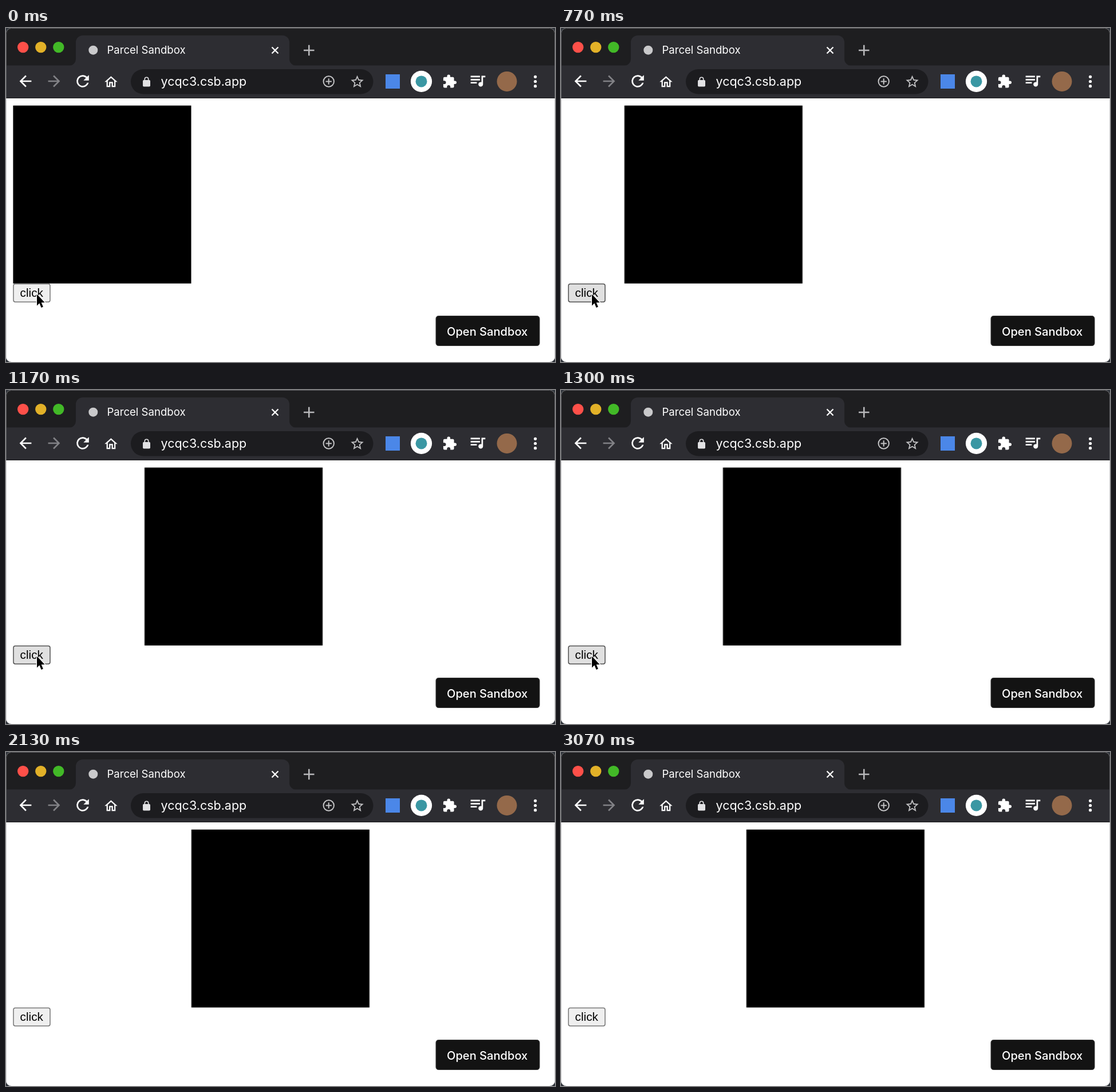
Recreate the animation shown at these times as an HTML page. Size 959x584 px, loop 3.11 s.

```html
<!DOCTYPE html>
<html lang="en">
<head>
<meta charset="utf-8">
<title>Sliding box</title>
<style>
  html, body { margin: 0; width: 100%; height: 100%; overflow: hidden; background: #30343b; }
  svg { display: block; width: 100%; height: 100%; }
  text { font-family: Inter, sans-serif; fill: #fff; white-space: pre; }

  .box, .cursor, .button { animation: 3110ms infinite step-end; }
  .box { animation-name: slide; }
  .cursor { animation-name: leave; }
  .button { animation-name: press; }

  /* Motion advances 30 times a second, with one dropped frame midway */
  @keyframes slide {
    0% { transform: translateX(0); }
    14.877% { transform: translateX(3.1px); animation-timing-function: steps(14); }
    29.882% { transform: translateX(151.3px); }
    30.954% { transform: translateX(168.2px); animation-timing-function: steps(14); }
    45.959%, 100% { transform: translateX(311.4px); }
  }
  @keyframes leave {
    0% { transform: translate(0, 0); }
    63.108% { transform: translate(30px, -14px); animation-timing-function: steps(5); }
    68.467%, 100% { transform: translate(1067px, -515px); }
  }
  @keyframes press {
    0% { fill: #efefef; stroke: #767676; }
    14.877% { fill: #e0e0e0; stroke: #4f4f4f; }
    63.108%, 100% { fill: #efefef; stroke: #767676; }
  }
</style>
</head>
<body>
<svg viewBox="0 0 959 584">
  <defs>
    <clipPath id="window"><rect width="959" height="584" rx="9"/></clipPath>
    <path id="arrow" d="M20 11H7.83l5.59-5.59L12 4l-8 8 8 8 1.41-1.41L7.83 13H20z"/>
  </defs>

  <g clip-path="url(#window)">
    <rect width="959" height="584" fill="#fff"/>

    <!-- Title bar, tab and toolbar -->
    <rect width="959" height="66" fill="#1e1e20"/>
    <rect y="65.5" width="959" height="57.5" fill="#2d2d32"/>
    <rect y="122" width="959" height="1" fill="#19191b"/>
    <path d="M110 66a12 12 0 0 0 12-12V25a12 12 0 0 1 12-12h349a12 12 0 0 1 12 12v29a12 12 0 0 0 12 12z" fill="#2d2d32"/>

    <circle cx="29.7" cy="33.6" r="9.7" fill="#fe5049"/>
    <circle cx="60.8" cy="33.6" r="9.7" fill="#e2b128"/>
    <circle cx="91.8" cy="33.6" r="9.7" fill="#42b927"/>

    <circle cx="152.3" cy="38.7" r="8" fill="#c9c9cb"/>
    <text x="176.4" y="45.4" font-size="18.6">Parcel Sandbox</text>
    <path d="M464.5 33.5l11 11m0-11l-11 11" stroke="#fff" stroke-width="2.3"/>
    <path d="M520 39h18.5m-9.25-9.25v18.5" stroke="#b8b8ba" stroke-width="2.6"/>

    <!-- Navigation -->
    <g fill="#fff">
      <use href="#arrow" transform="translate(18.4 77.4) scale(1.3)"/>
      <use href="#arrow" transform="translate(99.6 77.4) scale(-1.3 1.3)" fill="#828286"/>
      <path transform="translate(117.8 76.8) scale(1.35)" d="M17.65 6.35A7.96 7.96 0 0 0 12 4a8 8 0 1 0 7.73 10h-2.08A6 6 0 1 1 12 6c1.66 0 3.14.69 4.22 1.78L13 11h7V4z"/>
      <path transform="translate(170 80.9) scale(1.12)" d="M12 5.69l5 4.5V18h-2v-6H9v6H7v-7.81l5-4.5M12 3L2 12h3v8h6v-6h2v6h6v-8h3z"/>
    </g>

    <!-- Address field -->
    <rect x="218" y="72" width="423.5" height="43.5" rx="21.75" fill="#1c1c1f"/>
    <path transform="translate(235.8 84.6) scale(.81)" fill="#e2e2e4" d="M18 8h-1V6A5 5 0 0 0 7 6v2H6a2 2 0 0 0-2 2v10a2 2 0 0 0 2 2h12a2 2 0 0 0 2-2V10a2 2 0 0 0-2-2zM9 6a3 3 0 0 1 6 0v2H9z"/>
    <text x="270.5" y="101.3" font-size="21.5">ycqc3.csb.app</text>
    <g fill="none" stroke="#c2c2c4" stroke-width="2">
      <circle cx="563.7" cy="93.5" r="9.2"/>
      <path d="M558.5 93.5h10.4m-5.2-5.2v10.4"/>
    </g>
    <path transform="translate(600.1 80.4) scale(1.12)" fill="#c2c2c4" d="M22 9.24l-7.19-.62L12 2 9.19 8.63 2 9.24l5.46 4.73L5.82 21 12 17.27 18.18 21l-1.63-7.03zM12 15.4l-3.76 2.27 1-4.28-3.32-2.88 4.38-.38L12 6.1l1.71 4.04 4.38.38-3.32 2.88 1 4.28z"/>

    <!-- Extensions and menu -->
    <rect x="663" y="81" width="25" height="25" fill="#4b87e8"/>
    <circle cx="725.5" cy="93.4" r="18.6" fill="#fff"/>
    <circle cx="725.5" cy="93.4" r="10" fill="#3a97a3"/>
    <g fill="#fff">
      <path transform="translate(761.7 80.3) scale(1.1)" d="M20.5 11H19V7a2 2 0 0 0-2-2h-4V3.5a2.5 2.5 0 0 0-5 0V5H4a2 2 0 0 0-2 2v3.8h1.5a2.7 2.7 0 0 1 0 5.4H2V20a2 2 0 0 0 2 2h3.8v-1.5a2.7 2.7 0 0 1 5.4 0V22H17a2 2 0 0 0 2-2v-4h1.5a2.5 2.5 0 0 0 0-5z"/>
      <path transform="translate(807.6 75.5) scale(1.35)" d="M15 6H3v2h12zm0 4H3v2h12zM3 16h8v-2H3zM17 6v8.18A3 3 0 1 0 19 17V8h3V6z"/>
      <circle cx="924.6" cy="85.3" r="2.6"/>
      <circle cx="924.6" cy="93.5" r="2.6"/>
      <circle cx="924.6" cy="101.7" r="2.6"/>
    </g>
    <circle cx="875" cy="93.4" r="17.5" fill="#94694a"/>

    <!-- Page -->
    <rect class="box" x="12.4" y="135.6" width="311.1" height="311.1"/>
    <rect class="button" x="13" y="447.6" width="64" height="31.4" rx="3.2" stroke-width="1.5"/>
    <text x="24.6" y="470.3" font-size="20.74" style="font-family: 'Liberation Sans', Arial, sans-serif; fill: #000">click</text>

    <rect x="751" y="503.5" width="181" height="52" rx="4.5" fill="#131313" stroke="#343434"/>
    <text x="770" y="537.6" font-size="20.1" font-weight="500">Open Sandbox</text>

    <path class="cursor" d="M54 465.5v20l4.4-4.2 3.2 7.7 3.3-1.4-3.2-7.6h6z" stroke="#fff" stroke-width="2.4" paint-order="stroke"/>
  </g>

  <!-- Window edge -->
  <path d="M.5 123V9.5a9 9 0 0 1 9-9h940a9 9 0 0 1 9 9V123" fill="none" stroke="#606164"/>
  <path d="M.5 123v452a8.5 8.5 0 0 0 8.5 8.5M958.5 123v452a8.5 8.5 0 0 1-8.5 8.5" fill="none" stroke="#d4d4d6"/>
</svg>
</body>
</html>
```
